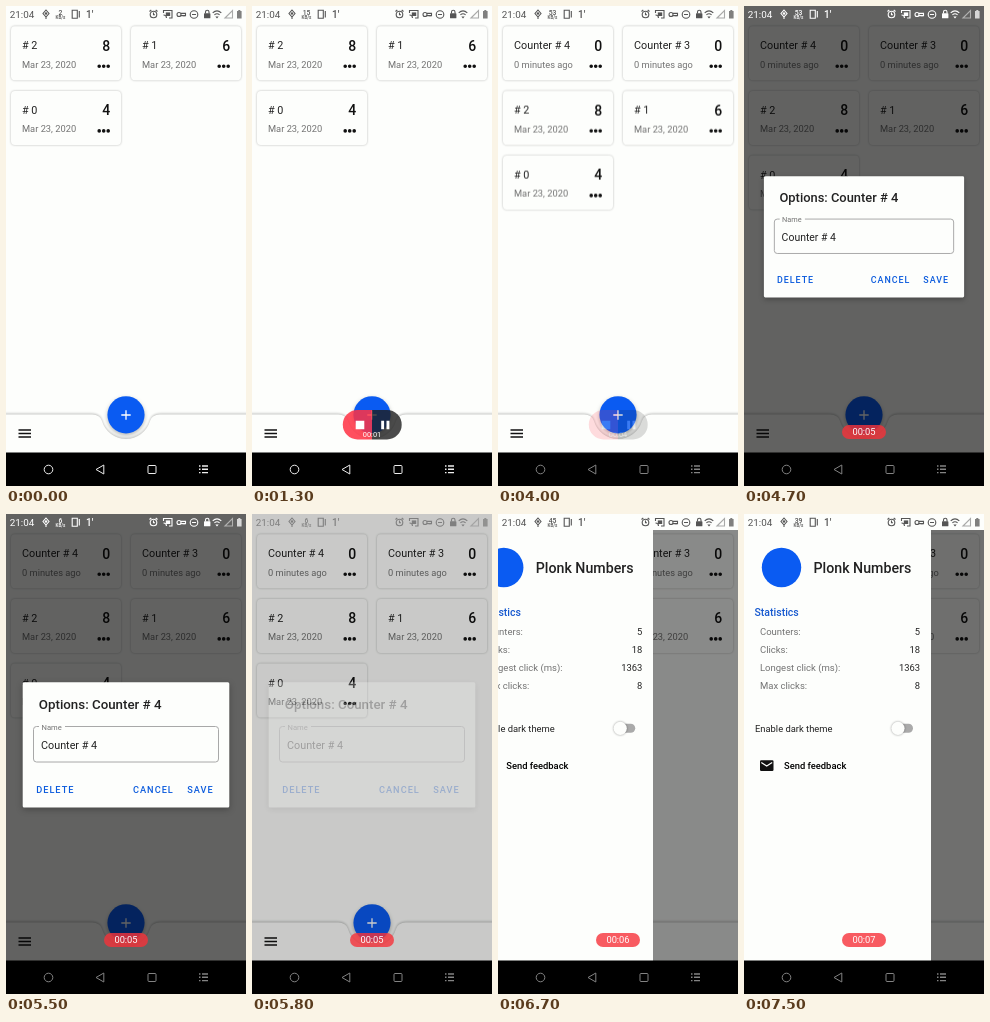
Recreate the animation shown at these times as an HTML page. Size 240x480 px, loop 8 s.

```html
<!DOCTYPE html>
<html lang="en">
<head>
<meta charset="utf-8">
<title>Counters</title>
<style>
html, body { margin: 0; width: 100%; height: 100%; overflow: hidden; background: #fdfefc; }
svg { display: block; width: 100vw; height: 100vh; }
text { font-family: Roboto, Arial, sans-serif; font-size: 9.4px; fill: #222; white-space: pre; }
.bold { font-weight: 500; }
.sub { fill: #737373; font-size: 9.3px; }
.end { text-anchor: end; }
.mid { text-anchor: middle; }
.title { font-size: 10.8px; }
.count { font-size: 14px; font-weight: 500; fill: #111; text-anchor: end; }
.action { font-size: 9.2px; font-weight: 500; letter-spacing: 1px; fill: #0b5bdd; }
.sheet { fill: #fdfefc; }
.card .sheet { filter: drop-shadow(0 .5px 1.3px rgba(0,0,0,.27)); }
#status { color: #555; }
#status text, .solid { fill: currentColor; }
.line { fill: none; stroke: currentColor; stroke-width: 1.1; }
#nav { fill: none; stroke: #eee; stroke-width: 1; }
#dialog { transform-origin: 120px 231px; }
</style>
</head>
<body>
<svg viewBox="0 0 240 480" preserveAspectRatio="none">
  <rect class="sheet" width="240" height="480"/>
  <g id="cards"></g>

  <path class="sheet" d="M-5 408.5H86Q94 408.5 96 415A25 25 0 0 0 144 415Q146 408.5 154 408.5H245V455H-5Z"
    style="filter:drop-shadow(0 -.6px 1.2px rgba(0,0,0,.24))"/>
  <path d="M12.5 424H25M12.5 427.5H25M12.5 431H25" stroke="#111" stroke-width="1.5"/>
  <circle cx="120" cy="408.8" r="18.6" fill="#0a5bf2" style="filter:drop-shadow(0 2px 2px rgba(0,0,0,.28))"/>
  <path d="M115.3 409H124.7M120 404.3V413.7" stroke="#fff" stroke-width="1.3"/>

  <rect id="scrim" y="16" width="240" height="431"/>
  <rect id="shade" width="240" height="447"/>

  <g id="status">
    <text x="3.7" y="12" style="font-size:9.9px">21:04</text>
    <path class="line" d="M40 4L43 7.5L40 11L37 7.5ZM40 10V13"/>
    <circle class="solid" cx="40" cy="7.5" r="1.2"/>
    <text id="speed" class="mid bold" x="54.5" y="8.6" style="font-size:6.8px"></text>
    <text class="mid bold" x="54.5" y="13.3" style="font-size:4.6px">KB/s</text>
    <path class="line" d="M66.2 4.2H71.3V12.3H66.2ZM73.3 5V11.5"/>
    <text class="bold" x="80" y="12" style="font-size:10px">1'</text>
    <circle class="line" cx="147.5" cy="8.5" r="3.3"/>
    <path class="line" d="M147.5 6.5V8.7H149M143.5 5.5L145.3 4M151.5 5.5L149.7 4"/>
    <path class="line" d="M157.5 7V4.5H166V12H163M157.5 9A3 3 0 0 1 160.5 12"/>
    <rect class="solid" x="159.8" y="6.4" width="4.4" height="3.6"/>
    <circle class="line" cx="173" cy="8.5" r="2"/>
    <path class="line" d="M175 7.4H179.5V9.6H175M178 9V10.6"/>
    <circle class="line" cx="188" cy="8.5" r="3.8"/>
    <path class="line" d="M186 8.5H190M199.5 7.5V6A1.7 1.7 0 0 1 203 6V7.5"/>
    <rect class="solid" x="198" y="7.3" width="6.4" height="5" rx=".6"/>
    <path class="line" d="M206.7 6.8Q211 2.8 215.3 6.8M208.4 8.8Q211 6.6 213.6 8.8"/>
    <path class="solid" d="M209.3 10.4H212.7L211 12.6Z"/>
    <path class="line" d="M219 12L226.5 4.5V12Z" style="opacity:.5"/>
    <path class="solid" d="M231 5H232.3V4H234.3V5H235.6V12.5H231Z" style="opacity:.75"/>
  </g>

  <g id="dialog">
    <rect class="sheet" x="16.7" y="168.3" width="206.6" height="125.2" rx="1.5"
      style="filter:drop-shadow(0 2px 3px rgba(0,0,0,.28))"/>
    <text class="bold" x="32.8" y="194.5" style="font-size:13.3px">Options: Counter # 4</text>
    <rect x="27.5" y="212.5" width="185" height="35.5" rx="3" fill="none" stroke="#a8a8a8"/>
    <rect class="sheet" x="33" y="210" width="26" height="5"/>
    <text class="sub" x="35.5" y="216" style="font-size:7.6px">Name</text>
    <text class="title" x="35" y="234.7">Counter # 4</text>
    <text class="action" x="30.2" y="278.7">DELETE</text>
    <text class="action" x="127" y="278.7">CANCEL</text>
    <text class="action" x="181.2" y="278.7">SAVE</text>
  </g>

  <g id="drawer">
    <rect class="sheet" x="-10" y="16" width="197" height="431"/>
    <circle cx="37.5" cy="53.5" r="19.7" fill="#0a5bf2"/>
    <text class="bold" x="69.5" y="59" style="font-size:14.2px">Plonk Numbers</text>
    <text class="bold" x="10.5" y="102.3" style="font-size:10.5px;fill:#1759cf">Statistics</text>
    <g id="stats"></g>
    <text x="11" y="218">Enable dark theme</text>
    <rect x="150" y="209.8" width="19" height="9" rx="4.5" fill="#aaa"/>
    <circle class="sheet" cx="154" cy="214.3" r="6.6" style="filter:drop-shadow(0 .8px 1px rgba(0,0,0,.4))"/>
    <rect x="16" y="246.3" width="13.5" height="10.7" rx="1.2" fill="#111"/>
    <path d="M17.3 248.5L22.7 252L28.2 248.5" fill="none" stroke="#fdfefc" stroke-width="1.2"/>
    <text class="bold" x="40" y="255.3" style="fill:#000">Send feedback</text>
  </g>

  <g id="recorder">
    <path d="M120 404H105.5A14.7 14.7 0 0 0 105.5 433.4H120Z" fill="rgba(255,50,68,.86)"/>
    <path d="M120 404H135A14.7 14.7 0 0 1 135 433.4H120Z" fill="rgba(30,30,30,.8)"/>
    <path d="M103.7 414.7H112.3V423.3H103.7ZM129.2 414.7H132.1V423.3H129.2ZM134.5 414.7H137.4V423.3H134.5Z" fill="#fff"/>
    <text class="mid timer" x="120" y="431" style="font-size:7.4px;fill:#fff"></text>
  </g>
  <g id="badge">
    <rect x="98" y="419" width="44" height="14" rx="7" fill="rgba(247,51,58,.8)"/>
    <text class="mid timer" x="120" y="429.4" style="font-size:9.3px;fill:#fff"></text>
  </g>

  <rect y="446.5" width="240" height="34"/>
  <g id="nav">
    <circle cx="42.5" cy="463.5" r="4.3"/>
    <path d="M97.8 459V468L90 463.5Z"/>
    <rect x="142" y="459.5" width="8" height="8" rx="1"/>
    <path d="M193 460H194.5M196 460H202M193 463.3H194.5M196 463.3H202M193 466.6H194.5M196 466.6H202" stroke-width="1.4"/>
  </g>
</svg>
<script>
const LOOP = 8000;
const byId = id => document.getElementById(id);

// Plays a table of [time, value, easing] steps on one property.
function play(el, prop, steps) {
  const table = [[0, steps[0][1]], ...steps, [LOOP, steps[steps.length - 1][1]]];
  const frames = table.map(([time, value, easing = 'linear']) => ({ offset: time / LOOP, [prop]: value, easing }));
  return el.animate(frames, { duration: LOOP, iterations: Infinity });
}

// Counters: slots before the first, after the first and after the second insertion.
const counters = [
  { name: '# 0', count: 4, slots: [2, 3, 4] },
  { name: '# 1', count: 6, slots: [1, 2, 3] },
  { name: '# 2', count: 8, slots: [0, 1, 2] },
  { name: 'Counter # 3', count: 0, slots: [0, 0, 1], born: 1700 },
  { name: 'Counter # 4', count: 0, slots: [0, 0, 0], born: 3200 }
];
const place = slot => `translate(${5 + 120 * (slot % 2)}px, ${20.3 + 64.6 * Math.floor(slot / 2)}px)`;

for (const { name, count, slots, born } of counters) {
  const card = document.createElementNS('http://www.w3.org/2000/svg', 'g');
  card.setAttribute('class', 'card');
  card.innerHTML = `<rect class="sheet" width="110" height="54" rx="4"/>
    <text class="title" x="11" y="23.2">${name}</text>
    <text class="sub" x="11" y="41.3">${born ? '0 minutes ago' : 'Mar 23, 2020'}</text>
    <text class="count" x="99.3" y="24.5">${count}</text>
    <path d="M88.2 40H88.21M92.7 40H92.71M97.2 40H97.21" stroke="#111" stroke-width="3.6" stroke-linecap="round"/>`;
  byId('cards').append(card);
  const [a, b, c] = slots.map(place);
  play(card, 'transform', [[1600, a, 'ease'], [2000, b], [3100, b, 'ease'], [3500, c]]);
  if (born) play(card, 'opacity', [[born, 0], [born + 300, 1]]);
}

byId('stats').innerHTML = [['Counters:', 5], ['Clicks:', 18], ['Longest click (ms):', 1363], ['Max clicks:', 8]]
  .map(([label, value], i) => `<text class="sub" style="font-size:9.5px" x="16" y="${121 + 18 * i}">${label}</text>
    <text class="end" x="176" y="${121 + 18 * i}">${value}</text>`).join('');

const clock = play(byId('recorder'), 'opacity', [[50, 0], [200, 1], [3700, 1], [4000, .2], [4200, 0]]);
play(byId('badge'), 'opacity', [[4150, 0], [4400, 1]]);
play(byId('nav'), 'opacity', [[1900, 1], [2600, .55]]);
play(byId('shade'), 'opacity', [[4300, 0], [4700, .61], [5650, .61], [5880, 0]]);
play(byId('status'), 'color', [[4400, '#555'], [4600, '#fff'], [5650, '#fff'], [5850, '#555']]);
play(byId('dialog'), 'opacity', [[4400, 0], [4700, 1], [5650, 1], [5850, 0]]);
play(byId('dialog'), 'transform', [[4400, 'scale(.8)', 'ease-out'], [4850, 'scale(1)']]);
play(byId('scrim'), 'opacity', [[6400, 0], [6500, .185], [6600, .35], [6700, .46], [6900, .56]]);
play(byId('stats'), 'opacity', [[6550, 0], [6550, 1]]);
play(byId('drawer'), 'transform',
  [[6400, -187], [6500, -134], [6600, -72], [6700, -32], [6800, -9], [6900, 0]]
    .map(([time, x]) => [time, `translate(${x}px, 0)`]));

const speeds = [[0, 2], [380, 15], [1480, 10], [3480, 53], [5480, 6], [6380, 45], [7480, 39]];
const seconds = [[0, 0], [380, 1], [1480, 2], [2780, 3], [3580, 4], [4680, 5], [6380, 6], [7480, 7]];
const valueAt = (table, time) => table.filter(([start]) => start <= time).pop()[1];
const timers = document.querySelectorAll('.timer');

function tick() {
  const time = Math.max(0, clock.currentTime || 0) % LOOP;
  byId('speed').textContent = valueAt(speeds, time);
  for (const timer of timers) timer.textContent = '00:0' + valueAt(seconds, time);
  requestAnimationFrame(tick);
}

// Every track starts together when the page loads.
const start = document.timeline.currentTime || 0;
for (const anim of document.getAnimations()) anim.startTime = start;
tick();
</script>
</body>
</html>
```
